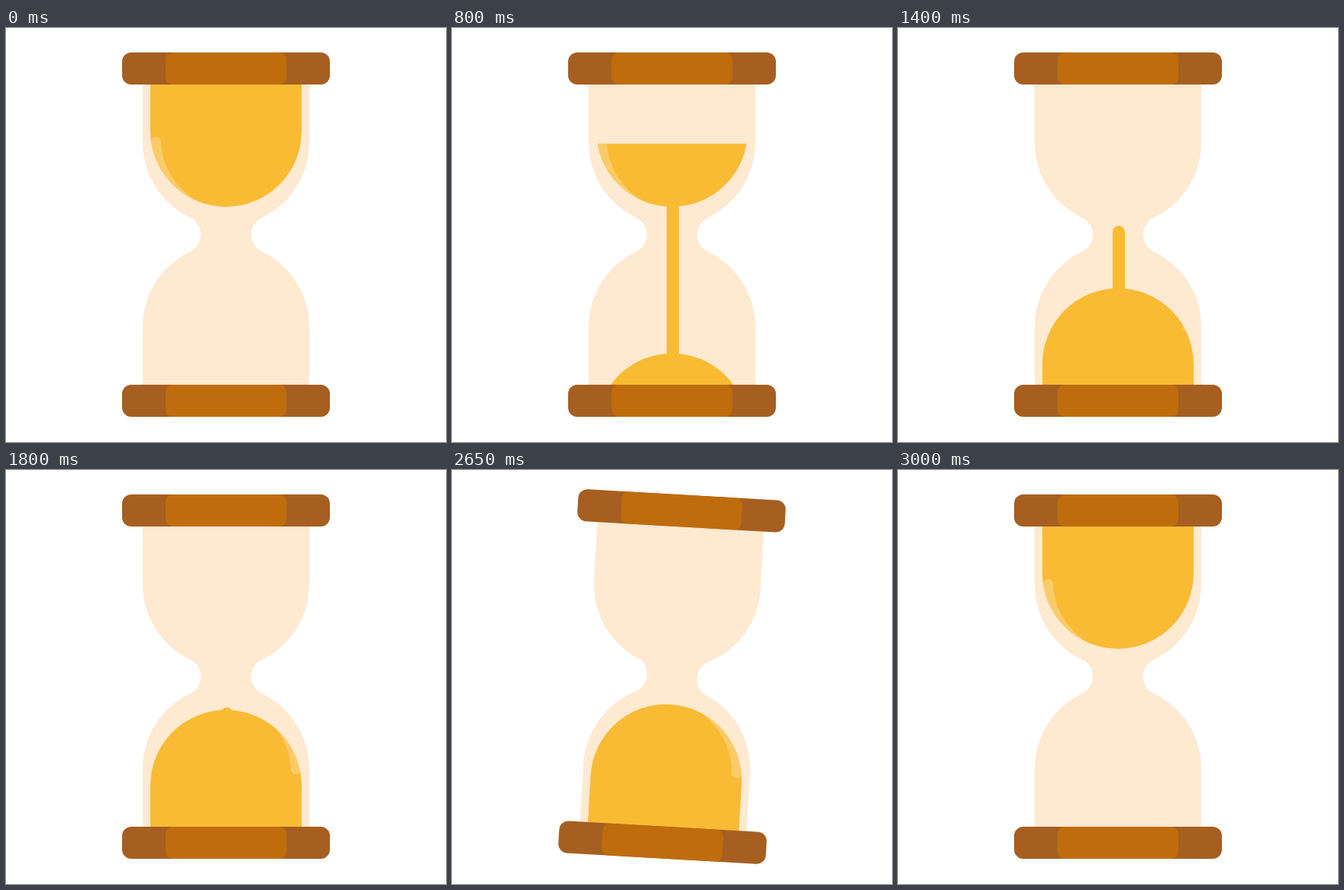
Animation of 576x542 px, one loop 3300 ms. Source, as an HTML page with a canvas:

```html
<!DOCTYPE html>
<html lang="en">
<head>
<meta charset="utf-8">
<title>Hourglass</title>
<style>
  html, body { margin: 0; width: 100%; height: 100%; overflow: hidden; background: #fff; }
  canvas { display: block; width: 576px; height: 542px; }
</style>
</head>
<body>
<canvas id="stage"></canvas>
<script>
const W = 576, H = 542, LOOP = 3300, STEP = 50;
const CX = 288, CY = 270.5, TOP = 74, FLOOR = 467;
const GLASS = '#fee9d1', SAND = '#f9bb33', WOOD = '#a65f20', PANEL = '#bf6d0c';

const canvas = document.getElementById('stage');
const ctx = canvas.getContext('2d');
const dpr = window.devicePixelRatio || 1;
canvas.width = W * dpr;
canvas.height = H * dpr;

const glass = new Path2D(
  'M179 60V150A109 109 0 0 0 240.4 248A24.5 24.5 0 0 1 240.4 293A109 109 0 0 0 179 391V480' +
  'H397V391A109 109 0 0 0 335.6 293A24.5 24.5 0 0 1 335.6 248A109 109 0 0 0 397 150V60Z');
const topSand = new Path2D('M189 60V135A99 99 0 0 0 387 135V60Z');
const shine = new Path2D(
  'M190 149A6.5 6.5 0 0 1 203 149C204 182 222 213 262 234C215 228 190 190 190 149Z');

const clamp = x => Math.min(1, Math.max(0, x));
const span = (t, a, b) => clamp((t - a) / (b - a));
const sine = p => (1 - Math.cos(Math.PI * p)) / 2;

// Symmetric cubic bezier (a, 0, 1 - a, 1), solved by bisection.
function ease(x, a) {
  let lo = 0, hi = 1;
  for (let i = 0; i < 30; i++) {
    const s = (lo + hi) / 2, r = 1 - s;
    if (3 * a * s * r * r + 3 * (1 - a) * s * s * r + s ** 3 < x) lo = s; else hi = s;
  }
  return lo * lo * (3 - 2 * lo);
}

function fill(path, color) {
  ctx.fillStyle = color;
  ctx.fill(path);
}

function box(x, y, w, h, r, color) {
  const path = new Path2D();
  path.roundRect(x, y, w, h, r);
  fill(path, color);
}

function bar(y) {
  box(152, y, 272, 42, 12, WOOD);
  box(209, y, 158, 42, 9, PANEL);
}

function halfTurn() {
  ctx.translate(CX, CY);
  ctx.rotate(Math.PI);
  ctx.translate(-CX, -CY);
}

// Sand with its highlight, limited to the rows from y0 to y1.
function sand(path, y0, y1, flipped) {
  if (y1 <= y0) return;
  ctx.save();
  ctx.beginPath();
  ctx.rect(0, y0, W, y1 - y0);
  ctx.clip();
  fill(path, SAND);
  ctx.clip(path);
  if (flipped) halfTurn();
  ctx.globalAlpha = 0.34;
  fill(shine, GLASS);
  ctx.restore();
}

function pile(t) {
  const y = 307 + 119 * (Math.max(0, 2200 - t) / 1400) ** 2.25;
  const path = new Path2D();
  path.arc(CX, y + 99, 99, Math.PI, 0);
  path.lineTo(387, y + 400);
  path.lineTo(189, y + 400);
  path.closePath();
  sand(path, TOP, FLOOR + 1, true);
}

function stream(t) {
  if (t < 200 || t >= 2000) return;
  const head = 228 + 245 * span(t, 150, 600) ** 1.3;
  const tail = Math.max(228, 259 + 0.13 * (t - 1400));
  box(281, tail, 16, Math.min(head, 475) - tail, 8, SAND);
}

function draw(t) {
  ctx.setTransform(dpr, 0, 0, dpr, 0, 0);
  ctx.fillStyle = '#fff';
  ctx.fillRect(0, 0, W, H);
  ctx.translate(CX, CY);
  ctx.rotate(Math.PI * ease(span(t, 2600, 3000), 0.575));
  ctx.translate(-CX, -CY);
  fill(glass, GLASS);
  sand(topSand, TOP + 162 * sine(span(t, 345, 1280)), FLOOR, false);
  stream(t);
  pile(t);
  bar(32);
  bar(FLOOR);
}

const start = performance.now();
function tick() {
  const t = (performance.now() - start) % LOOP;
  // The upright start pose equals the fully turned one.
  draw(Math.floor(t / STEP) * STEP);
  requestAnimationFrame(tick);
}
tick();
</script>
</body>
</html>
```
